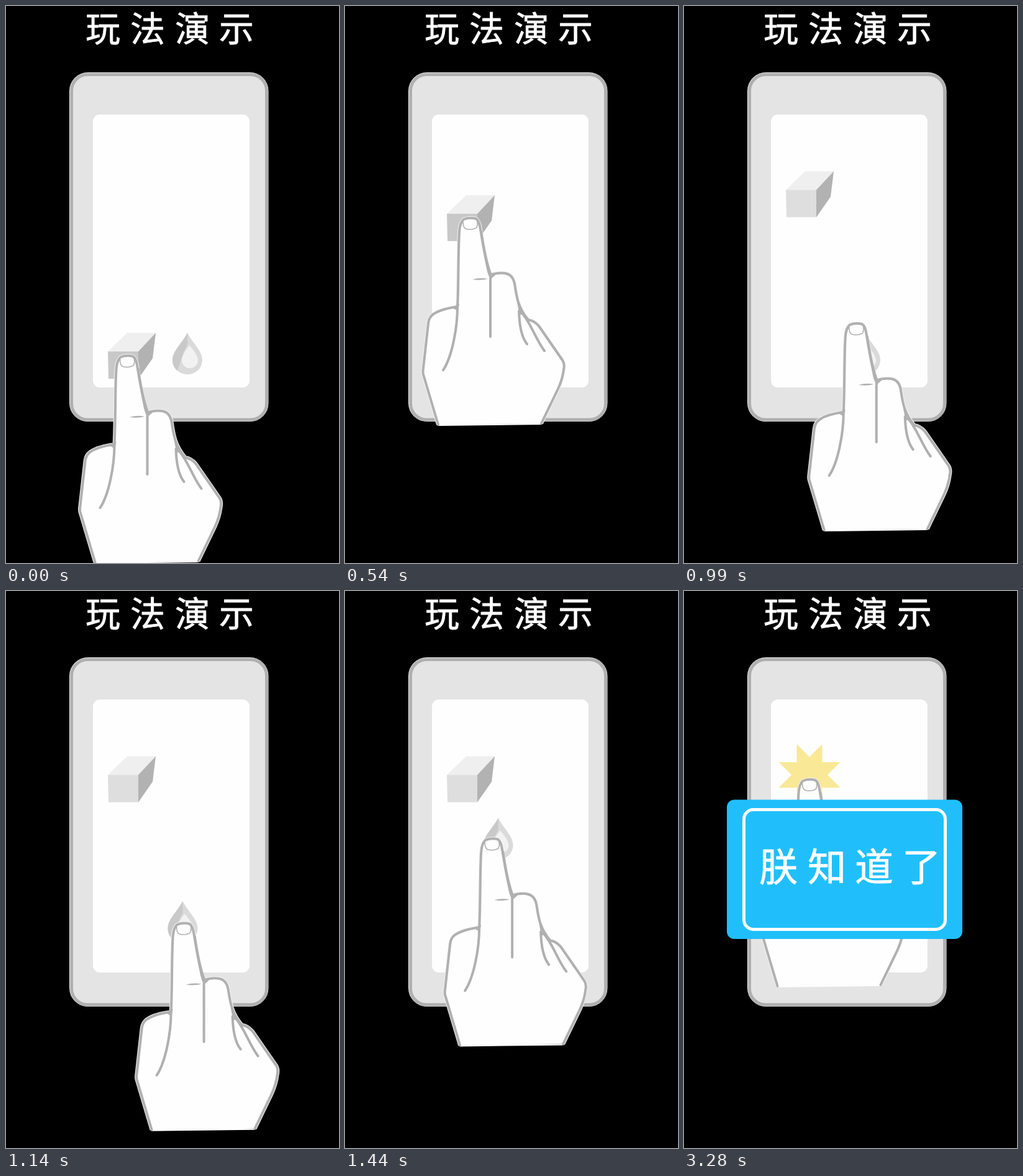
Recreate the animation shown at these times as an HTML page. Size 536x898 px, loop 3310 ms.

```html
<!DOCTYPE html>
<html lang="zh">
<head>
<meta charset="utf-8">
<style>
  html, body { margin: 0; width: 100%; height: 100%; overflow: hidden; background: #000; }
  svg { display: block; width: 536px; height: 898px; }
  text {
    font-family: "Noto Sans CJK TC", "Noto Sans CJK SC", "Noto Sans CJK", sans-serif;
    font-weight: 500; text-anchor: middle;
    fill: #fff; stroke: #fff; stroke-width: .8; stroke-linejoin: round;
  }
  .line { fill: none; stroke: #b0b0b0; stroke-width: 4; stroke-linecap: round; stroke-linejoin: round; }
  .halo { fill: none; stroke: #f4f4f4; stroke-width: 6; stroke-linejoin: round; }
</style>
</head>
<body>
<svg viewBox="0 0 536 898">
  <defs>
    <path id="edge" d="M150 675 L126 594 Q125 590 126 584 L134 512 Q135 502 142 497 Q155 488 181 485
      C183 450 182 395 184 364 Q185 349 191 344 Q201 340 211 343 Q216 346 218 360
      C222 385 227 414 233 434 Q246 429 258 431 Q270 433 273 448 C276 468 278 486 295 506
      Q304 507 312 516 L350 571 Q354 577 352 586 Q350 602 343 617 L316 673"/>
  </defs>

  <text x="156 228 300 371" y="57" font-size="56">玩法演示</text>

  <rect class="halo" x="105" y="110" width="314.5" height="557" rx="27"/>
  <rect x="105.5" y="110.5" width="314" height="556.5" rx="26" fill="#e4e4e4" stroke="#b0b0b0" stroke-width="5"/>
  <rect x="140" y="175" width="252" height="440" rx="11" fill="#fefefe"/>

  <g id="cube">
    <path d="M164 557 L195 527 H241 L213 557Z" fill="#efefef"/>
    <path id="front" d="M164 557 H213 V601 H165Z"/>
    <path d="M213 557 L241 527 L236 568 L213 601Z" fill="#b2b2b2"/>
  </g>

  <g id="drop">
    <path d="M292 527 C302 546 316 556 316 571 A24 23 0 0 1 268 571 C268 556 282 546 292 527Z" fill="#dadada"/>
    <path d="M292 527 C282 546 268 556 268 571 Q268 582 276 588 L285 560 L292 546Z" fill="#c9c9c9"/>
    <path d="M295 547 Q309 563 309 571 A13 13 0 0 1 283 571 Q283 563 295 547Z" fill="#f2f2f2"/>
  </g>

  <path id="star" fill="#f9e896"/>

  <g id="hand">
    <use href="#edge" class="halo"/>
    <use href="#edge" fill="#fefefe"/>
    <path d="M150 674 L316 673 L315 675 L150 677Z" fill="#fefefe"/>
    <use href="#edge" class="line"/>
    <path class="line" d="M181 485 C181 520 172 566 158 587 M234 436 V533
      M280 492 Q281 530 293 545 M284 494 C300 512 306 536 321 556"/>
    <path d="M217 360 L221 362 Q227 405 236 431 L244 432 L235 440 Q229 434 227 418Z M172 486 L184 480 L182 492Z
      M205 441 Q218 437 230 440 Q218 443 205 441Z M277 478 L287 497 L281 498Z" fill="#b0b0b0"/>
    <path class="line" style="stroke-width:1.6" d="M190 348 Q190 357 194 359 Q202 362 211 358 Q214 355 213 347"/>
  </g>

  <g id="button">
    <rect x="69" y="336.5" width="379" height="224.5" rx="12" fill="#20bffc"/>
    <rect x="96.5" y="352.5" width="324" height="193" rx="15" fill="none" stroke="#fff" stroke-width="5"/>
    <text x="152 230 306 382" y="468" font-size="62">朕知道了</text>
  </g>
</svg>
<script>
const LOOP = 3310, STEP = 30;
const GRAB_DROP = 1080, ARRIVE = 1650, BURST = 1680, BUTTON = 3280;
const CUBE_PLACED = 570;

// Fingertip path: time, x, y
const path = [
  [0, 196, 563], [540, 202.5, 341], [CUBE_PLACED, 203, 303],
  [840, 247, 426], [GRAB_DROP, 297, 562], [ARRIVE, 203, 303]
];

const $ = id => document.getElementById(id);
const move = (id, x, y) => $(id).setAttribute('transform', `translate(${x} ${y})`);
const show = (id, on) => $(id).setAttribute('visibility', on ? 'visible' : 'hidden');
const clamp = v => Math.max(0, Math.min(1, v));

function tipAt(t) {
  let i = 1;
  while (i < path.length - 1 && t > path[i][0]) i++;
  const [t0, x0, y0] = path[i - 1], [t1, x1, y1] = path[i];
  const u = clamp((t - t0) / (t1 - t0));
  return [x0 + (x1 - x0) * u, y0 + (y1 - y0) * u];
}

// Eight-pointed burst
const points = Array.from({ length: 16 }, (_, i) => {
  const a = (i + 1) * Math.PI / 8, r = i % 2 ? 29 : 53.5;
  return `${(202 + r * Math.cos(a)).toFixed(1)} ${(296.5 + r * Math.sin(a)).toFixed(1)}`;
});
$('star').setAttribute('d', `M${points.join('L')}Z`);

function draw(time) {
  const t = Math.floor(time / STEP) * STEP;
  const [x, y] = tipAt(t);
  const carried = clamp((t - GRAB_DROP) / (ARRIVE - GRAB_DROP));
  const cubeY = t < CUBE_PLACED ? y - 563 : -260.5;

  move('hand', x - 202.5, y - 341);
  move('cube', 0, cubeY);
  move('drop', -72 * carried, -255 * carried);
  $('front').setAttribute('fill', t < CUBE_PLACED ? '#c8c8c8' : '#dedede');

  show('cube', t < BURST);
  show('drop', t < BURST);
  show('star', t >= BURST);
  show('button', time >= BUTTON);
}

const start = performance.now();
function tick() {
  draw((performance.now() - start) % LOOP);
  requestAnimationFrame(tick);
}
tick();
</script>
</body>
</html>
```
